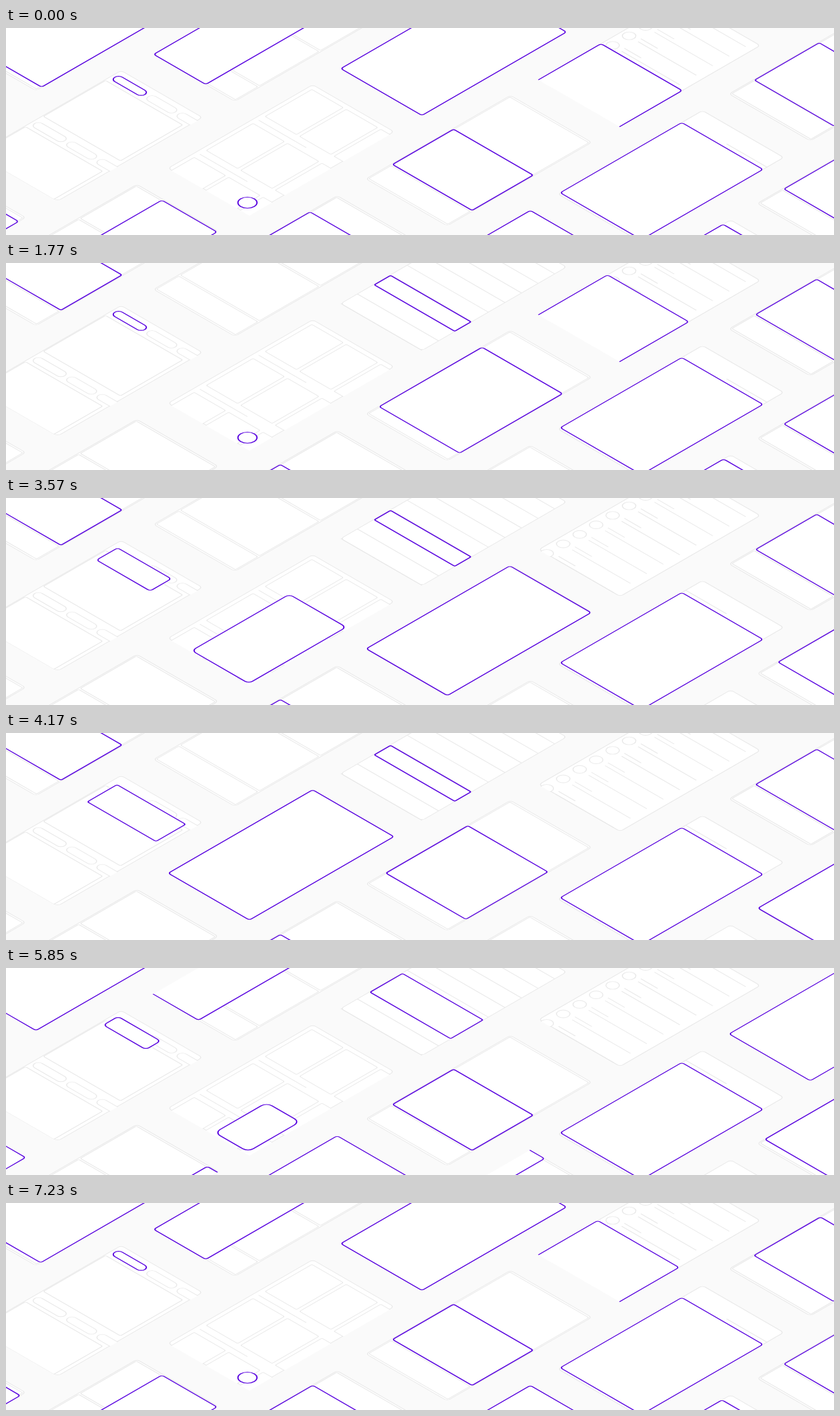
Recreate the animation shown at these times as an HTML page with a canvas. Size 1280x320 px, loop 7260 ms.

```html
<!DOCTYPE html>
<html>
<head>
<meta charset="utf-8">
<style>
html, body { margin: 0; height: 100%; overflow: hidden; background: #fafafa; }
canvas { display: block; }
</style>
</head>
<body>
<canvas width="1280" height="320"></canvas>
<script>
const ctx = document.querySelector('canvas').getContext('2d');
const LOOP = 7260, MOVE = 1000, HOLD = 2235;
const W = 145, H = 258;
const FAINT = '#e9e9e9', ACCENT = '#5b06e0';

const ease = p => (1 - Math.cos(Math.PI * Math.min(1, Math.max(0, p)))) / 2;
const mix = (a, b, p) => a.map((v, i) => v + (b[i] - v) * p);

// Rises to 1 at the start time, falls back after the hold.
function openness(t, start, hold = HOLD) {
  const age = (t - start + 2 * LOOP) % LOOP;
  return ease(age / MOVE) - ease((age - hold) / MOVE);
}

function box([x, y, w, h, r = 2], accent) {
  ctx.beginPath();
  ctx.roundRect(x, y, w, h, r);
  ctx.fillStyle = '#fff';
  ctx.fill();
  ctx.lineWidth = accent ? 1.7 : 1.25;
  ctx.strokeStyle = accent ? ACCENT : FAINT;
  ctx.stroke();
}

function line(x1, x2, y) {
  ctx.beginPath();
  ctx.moveTo(x1, y);
  ctx.lineTo(x2, y);
  ctx.lineWidth = 1.25;
  ctx.strokeStyle = FAINT;
  ctx.stroke();
}

// Static wireframes
function feed() {
  box([2, 3, W - 4, 100]);
  box([2, 106, W - 4, 106]);
  box([2, 215, W - 4, 40]);
}

function rows() {
  for (let y = 21; y < H; y += 29.6) line(0, W, y);
}

function contacts(h) {
  for (let y = h - 1; y > 0; y -= 29.4) {
    box([4.5, y - 8.5, 17, 17, 8.5]);
    line(28, 58, y - 6);
    line(30, 134, y + 1);
  }
}

function gallery() {
  for (let row = 0; row < 3; row++) {
    const y = 8 + row * 105;
    for (let col = 0; col < 3; col++) box([6.5 + col * 61.5, y, 56, 83.5]);
    line(6.5, 91.5, y + 95);
  }
}

function chips() {
  for (let row = 0; row < 2; row++) {
    const y = 9.2 + row * 143;
    if (row) box([4.7, y, 53.5, 13.5, 6.75]);
    box([64.5, y, 48, 13.5, 6.75]);
    box([118.5, y, 54, 13.5, 6.75]);
    box([1.5, y + 20, 137.5, row ? 87 : 111]);
  }
}

// Animated parts
const FULL = [0, 0, W, H, 4];
const grow = rest => p => box(mix(rest, FULL, p), true);
const photo = grow([1.5, 103, 142, 109, 3]);
const listRow = grow([1, 170, 143.5, 29, 2]);
const fab = grow([112, 228.5, 24, 24, 12]);
const menu = p => box(mix([4.7, 9.2, 53.5, 13.5, 6.75], [10.5, 17.8, 122.5, 53, 3], p), true);
const drawerLeft = p => box([97 * (p - 1), 0, 93, H, 4], true);
const drawerRight = p => box([W + 4 - 102.5 * p, 2, 98.5, H - 4, 4], true);
const sheet = size => (p, h) => box([0, h + 4 - (size + 4) * p, W, size + 20, 4], true);
function pager(p) {
  line(73 * (1 - p), 73 * (2 - p), 30);
  for (const page of [0, 1]) box([149 * (page - p), 37, W, 217, 4], true);
}

const cards = [
  { x: -21.5, y: -188, base: feed, part: photo, start: 4710 },
  { x: -24.5, y: 120, base: feed, part: photo, start: -100 },
  { x: 172.5, y: -349, base: feed, part: drawerLeft, start: 5090 },
  { x: 168.5, y: -37, base: chips, part: menu, start: 3000 },
  { x: 165.5, y: 275.5, base: feed, part: photo, start: 4800 },
  { x: 361.5, y: -494, base: rows, part: listRow, start: 5620 },
  { x: 361.5, y: -186, base: gallery, part: fab, start: 2980 },
  { x: 358.7, y: 125, base: feed, part: drawerRight, start: 5550 },
  { x: 555.3, y: -646, h: 250, base: contacts, part: sheet(141), start: 6563 },
  { x: 554.5, y: -346, base: feed, part: photo, start: 1270 },
  { x: 555, y: -36.3, base: feed, part: photo, start: 4540 },
  { x: 747.3, y: -801.5, base: feed, part: photo, start: 4160 },
  { x: 749.3, y: -494, part: pager, start: 2535, hold: 3495 },
  { x: 750, y: -186, base: feed, part: drawerLeft, start: 5480 },
  { x: 941.8, y: -657.5, base: feed, part: photo, start: 3260 },
  { x: 943.5, y: -350, part: sheet(245.5), start: 6300, hold: 2720 }
];

function drawCard({ x, y, h = H, base, part, start, hold }, t) {
  ctx.save();
  ctx.translate(x, y);
  box([0, 0, W, h, 5]);
  ctx.beginPath();
  ctx.rect(-1, -1, W + 2, h + 2);
  ctx.clip();
  if (base) base(h);
  part(openness(t, start, hold), h);
  ctx.restore();
}

function draw() {
  const t = performance.now() % LOOP;
  ctx.resetTransform();
  ctx.fillStyle = '#fafafa';
  ctx.fillRect(0, 0, 1280, 320);
  ctx.setTransform(0.866, 0.5, -0.866, 0.5, 0, 0);
  for (const card of cards) drawCard(card, t);
  requestAnimationFrame(draw);
}
draw();
</script>
</body>
</html>
```
